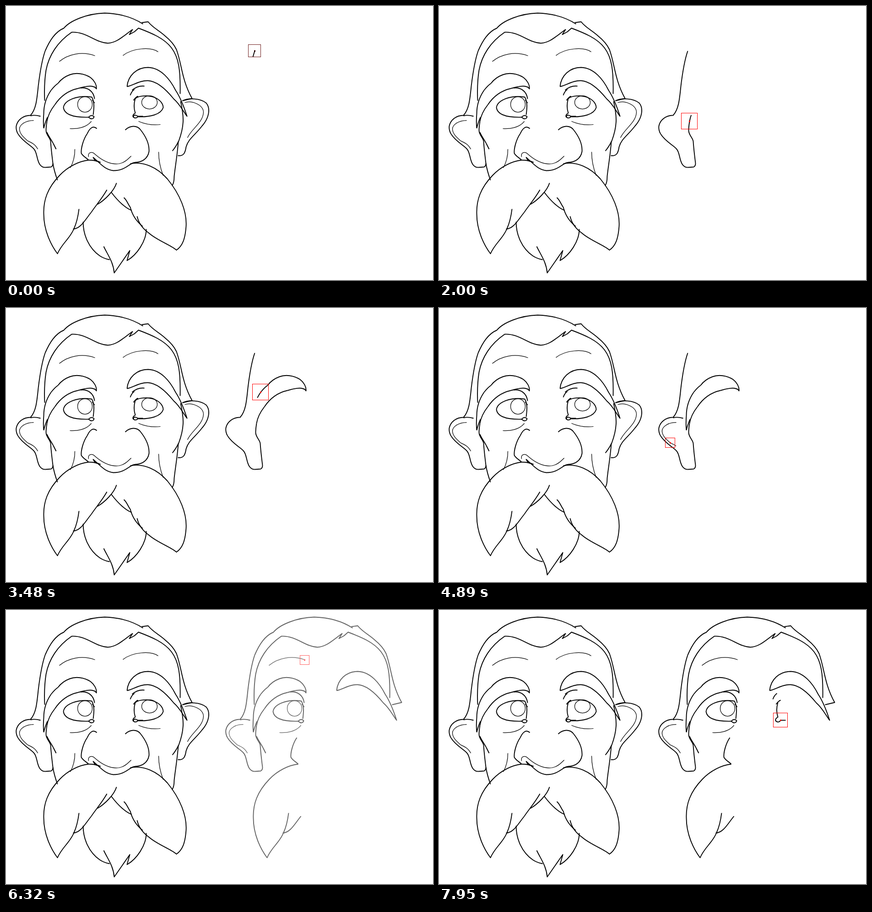
Animation, 933 px wide and 600 px high, one loop 8000 ms. Source, as an HTML page:

```html
<!DOCTYPE html>
<html lang="en">
<head>
<meta charset="utf-8">
<title>Drawing a face</title>
<style>
html, body { margin: 0; width: 100%; height: 100%; overflow: hidden; background: #fff; }
svg { display: block; }
path, ellipse { fill: none; stroke: #000; stroke-width: 1.9; stroke-linejoin: round; }
.thin { stroke-width: 1.25; }
.gap { stroke: none; }
</style>
</head>
<body>
<svg width="933" height="600" viewBox="-.5 -.5 933 600">
  <!-- parts that also appear in the copy -->
  <g id="shared">
    <path d="M85 98C95 75 107 56 126 48C140 31 178 16 215 15C248 16 276 24 299 39"/>
    <path d="M296 36L310 34C320 47 334 53 347 65C358 74 367 84 372 95C384 128 383 160 406 202L385 207"/>
    <path d="M84 207C83 185 83 165 87 140C93 108 112 78 143 57C175 55 195 80 222 81C242 80 256 65 276 51L269 62L280 56L289 48C318 59 345 70 361 91C377 112 381 140 380 192"/>
    <path d="M264 176C266 152 285 134 310 134C338 135 358 160 370 184C382 202 389 222 395 241C386 229 379 214 366 203C349 182 330 164 310 163C293 162 278 173 264 176"/>
    <path d="M190 238C192 222 193 210 187 199C155 194 127 206 125 222C127 236 145 244 181 243"/>
    <path d="M180 243Q186 236 192 242Q190 248 184 246Z"/>
    <path d="M162 179C178 177 191 186 193 203"/>
    <path d="M188 205L193 212"/>
    <ellipse class="thin" cx="172" cy="215" rx="16" ry="17"/>
    <path class="thin" d="M139 268C155 269 175 266 186 252"/>
    <path d="M177 279C168 292 163 312 164 322C168 329 174 331 180 337"/>
    <path d="M180 337C160 339 135 351 117 370C90 398 81 425 82 455C82 490 97 522 112 542C121 520 140 508 148 487C154 474 157 460 159 444"/>
    <path d="M146 488C163 487 172 468 186 451"/>
  </g>
  <!-- the finished face only -->
  <g id="face">
    <path d="M177 279C183 266 190 261 198 268"/>
    <path d="M260 271C270 261 285 260 293 270C305 285 313 300 312 318C309 335 295 342 282 342C270 342 262 360 234 360C216 358 206 345 190 331L194 338L206 342"/>
    <path d="M180 337C190 337 198 338 206 342"/>
    <path class="thin" d="M180 330C178 319 188 317 195 325C210 338 228 347 246 345C258 343 266 335 273 328"/>
    <path d="M271 345C300 339 330 353 352 378C380 412 395 450 393 482C391 510 385 525 372 534C360 523 330 513 312 497C298 487 289 474 286 460"/>
    <path d="M230 408C245 428 262 443 274 447"/>
    <path d="M257 419C264 425 266 434 271 440C276 460 288 474 298 482"/>
    <path d="M241 387C236 404 215 425 199 434"/>
    <path d="M220 402C210 420 196 436 186 451"/>
    <path d="M168 472C168 500 180 530 205 547C213 552 220 554 226 555"/>
    <path d="M213 526C222 545 234 560 236 584L270 535L264 557C285 545 306 515 306 488"/>
    <path d="M385 207C400 200 425 202 437 212C447 224 443 245 428 262C412 283 398 290 393 308C391 322 387 329 375 327"/>
    <path class="thin" d="M390 211C405 206 430 215 431 232C430 255 405 268 396 288"/>
    <path d="M381 208C388 240 390 260 377 295C372 305 368 311 363 317"/>
    <path d="M376 296C374 325 370 345 367 372Q367 388 362 393"/>
    <path d="M102 344C104 357 108 370 112 381"/>
    <path class="thin" d="M150 313C150 330 146 343 140 354"/>
    <path class="thin" d="M333 319C333 340 338 358 343 371"/>
    <path d="M279 206C284 195 310 194 325 200C338 206 343 215 343 222C338 237 315 243 288 242"/>
    <path d="M278 243Q278 235 288 241"/>
    <ellipse class="thin" cx="313" cy="210.5" rx="17" ry="14.5"/>
    <path d="M275 184C283 177 293 174 302 175"/>
    <path class="thin" d="M289 252C305 259 320 261 337 259"/>
    <path class="thin" d="M255 108C275 92 315 88 332 100"/>
  </g>
  <g id="copy" transform="translate(458)">
    <use id="added" href="#shared"/>
    <g id="ink"></g>
    <rect id="box" fill="none"/>
    <rect id="dot" width="3" height="3"/>
  </g>
</svg>
<script>
const LOOP = 8000, LEAD = 14, CUT = 6060;
const $ = id => document.getElementById(id);

// pen route: [end time, path, class]; a gap is travel with the pen lifted
const legs = [
  [860, 'M85 98C77 121 73 150 70 175C67 205 65 226 53 239C38 239 25 248 22 262C21 268 23 276 26 280'],
  [1260, 'M26 280C36 296 53 304 60 312C68 320 66 335 73 346C77 352 81 353 85 353'],
  [2000, 'M85 353L98 352C102 350 102 347 102 344C100 328 98 312 97 296C96 288 87 282 87 272C87 265 88 258 89 252'],
  [2140, 'M89 252C91 240 95 230 106 216'],
  [2470, 'M106 216C118 198 134 185 157 180'],
  [3410, 'M157 180C172 175 185 174 190 176C194 177 196 179 197 181C198 172 192 162 184 156C170 147 152 145 139 150C128 154 119 161 113 169'],
  [3480, 'M113 169C107 173 102 179 98 184'],
  [3950, 'M98 184C87 200 82 215 82 235C81 247 81 258 82 267'],
  [4060, 'M82 267C84 258 87 250 90 243'],
  [4170, 'M90 243L75 241', 'gap'],
  [4290, 'M75 241C68 239 60 238 53 240'],
  [4380, 'M53 240L60 250', 'gap'],
  [4890, 'M60 250C42 250 28 260 29 270C30 280 38 287 47 295', 'thin'],
  [5090, 'M47 295C56 299 63 302 69 313', 'thin'],
  [5250, 'M69 313L89 276', 'gap'],
  [5710, 'M89 276C92 284 98 291 103 301'],
  [5920, 'M103 301L109 313'],
  [CUT, 'M109 313L116 121', 'gap'],
  [6320, 'M116 121C135 105 165 98 194 108.5', 'thin'],
  [6900, 'M194 108.5L280 182', 'gap'],
  [7300, 'M280 182C276 185 273 189 271 195'],
  [7480, 'M271 195L288 197', 'gap'],
  [7600, 'M288 197C284 198 281 202 278 206'],
  [7620, 'M278 206L282 202', 'gap'],
  [7950, 'M282 202C279 212 278 222 282 234C278 236 275 240 278 243C281 246 286 245 288 241'],
  [8300, 'M288 241h11']
];

let start = 0, offset = 0;
const route = legs.map(([end, d, kind = '']) => {
  const path = document.createElementNS('http://www.w3.org/2000/svg', 'path');
  path.setAttribute('d', d);
  path.setAttribute('class', kind);
  $('face').append(path.cloneNode());
  $('ink').append(path);
  const leg = { path, start, end, offset, length: path.getTotalLength() };
  start = end;
  offset += leg.length;
  return leg;
});

// half the width of the pen box over time
const sizes = [[0, 14], [500, 13], [860, 17], [1260, 26], [2000, 18], [2140, 24.5], [2470, 22], [3410, 20],
  [3480, 18], [4170, 28], [4890, 11], [5710, 17], [6320, 10.5], [6740, 26], [7950, 16], [8000, 16]];

const clamp = (x, max = 1) => Math.max(0, Math.min(max, x));
const set = (el, attrs) => { for (const k in attrs) el.setAttribute(k, attrs[k]); };

function sizeAt(t) {
  const i = sizes.findIndex(s => s[0] > t);
  const [t0, a] = sizes[i - 1], [t1, b] = sizes[i];
  return a + (b - a) * (t - t0) / (t1 - t0);
}

function draw(t) {
  const now = route.find(leg => t < leg.end);
  const along = now.length * (t - now.start) / (now.end - now.start);
  const tip = now.offset + along + LEAD;
  for (const { path, offset, length } of route) {
    const shown = clamp(tip - offset, length);
    path.style.display = shown ? '' : 'none';
    path.style.strokeDasharray = shown < length ? `${shown} 999` : 'none';
  }

  const p = now.path.getPointAtLength(along);
  const side = Math.round(sizeAt(t) * 2), half = Math.floor(side / 2);
  const x = Math.round(p.x), y = Math.round(p.y);
  const warm = clamp(t / 200);
  set($('box'), { x: x - half, y: y - half, width: side - 1, height: side - 1,
    stroke: `rgb(${110 + 145 * warm},${30 - 30 * warm},${30 - 30 * warm})` });
  set($('dot'), { x: x - 1.5, y: y - 1.5, fill: `rgb(${40 + 215 * warm},0,0)` });

  $('added').style.display = t < CUT ? 'none' : '';
  $('copy').style.opacity = t < CUT ? clamp((5920 - t) / 420) : clamp((t - CUT) / 430);
}

function frame() {
  draw(performance.now() % LOOP);
  requestAnimationFrame(frame);
}
frame();
</script>
</body>
</html>
```
